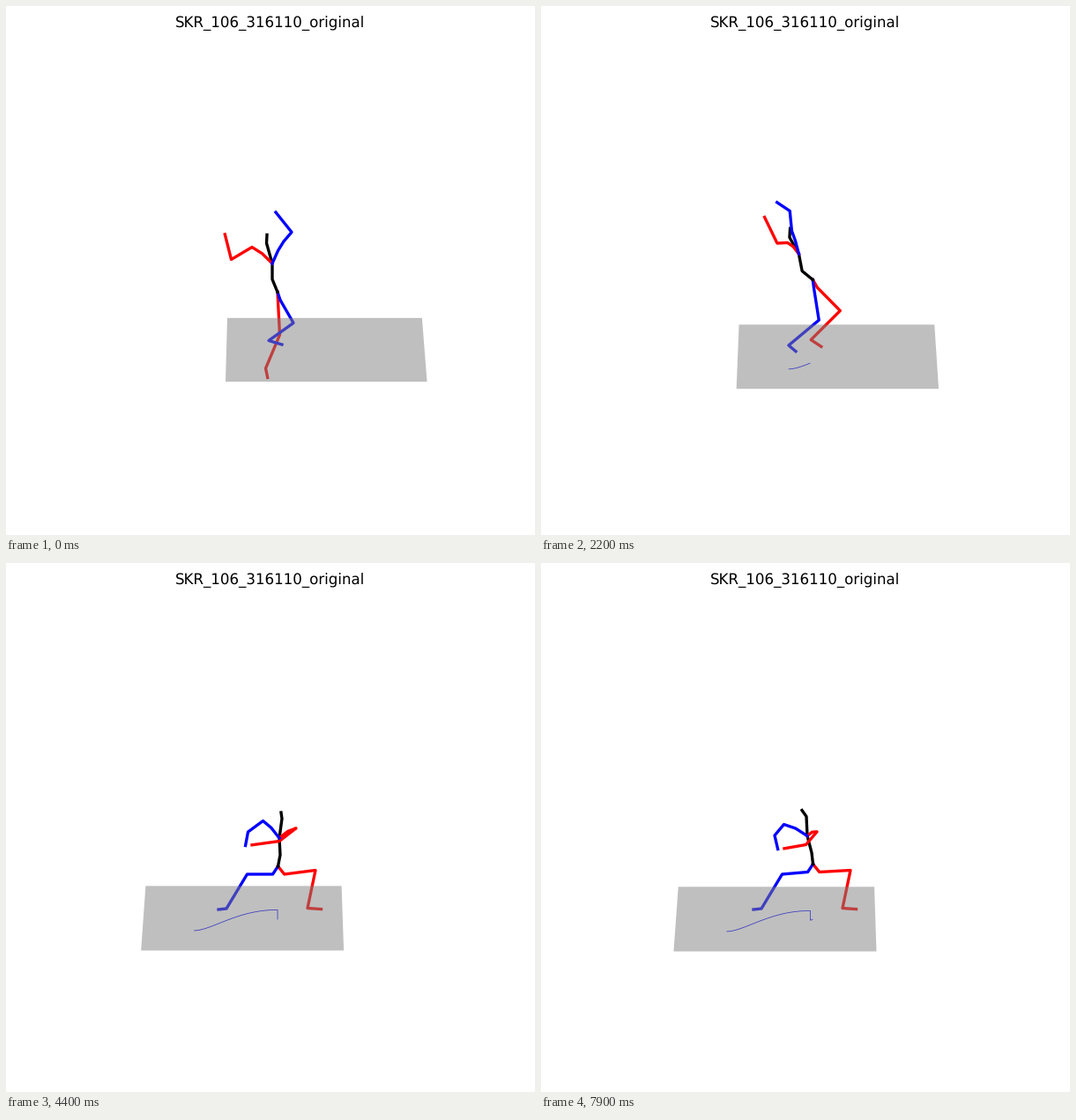
Recreate the animation shown at these times as a matplotlib script. Size 600 by 600 pixels, loop 8 s.

```python
import numpy as np
import matplotlib.pyplot as plt
from matplotlib.animation import FuncAnimation
from matplotlib.patches import Polygon

SIZE, DPI, FRAMES, STEP = 600, 100, 80, 100
LANDING, SETTLED = 36, 41
CENTER_X, FLOOR_Y, TRAIL_Y = 308, 390, 404

# Rows of a pose: 0-4 spine from root to head, 5-7 right arm, 8-10 left arm,
# 11-13 right leg, 14-16 left leg.
UPPER, SPINE, ARMS = slice(0, 11), slice(0, 5), slice(5, 11)


def pose(spine, right_arm, left_arm, right_leg, left_leg):
    return np.array(spine + right_arm + left_arm + right_leg + left_leg, float)


def tilt(points, pivot, degrees):
    a = np.radians(degrees)
    turn = np.array([[np.cos(a), np.sin(a)], [-np.sin(a), np.cos(a)]])
    return pivot + (points - points[0]) @ turn.T


wind_up = pose(
    [(308, 324.5), (302, 310), (302, 292), (295.5, 269), (296, 259.5)],
    [(279, 273.5), (255.5, 287.5), (248.3, 259)],
    [(315, 267), (324, 256.5), (306, 234)],
    [(310.5, 373), (294.5, 411), (296.7, 421.5)],
    [(326, 359.5), (298, 379.5), (313, 384)])

lean_back = np.vstack([
    tilt(wind_up[UPPER], (308.5, 317), 11),
    [(311, 368.5), (286, 404.5), (291.7, 414)],
    [(319, 355.5), (290, 380.5), (302.5, 386.5)]])

kick = pose(
    [(308, 315.5), (297.5, 307), (296, 286.5), (289.5, 269), (293, 259)],
    [(298, 275), (297.5, 265), (288.7, 237)],
    [(281, 261), (279, 236), (277.5, 233.3)],
    [(359, 333.5), (326, 367), (342, 372.5)],
    [(304.3, 359.5), (269.5, 391.5), (271.8, 397.5)])

lunge = pose(
    [(308, 355), (314.5, 343), (322, 323.5), (330, 303), (339, 296)],
    [(343, 315), (363, 318.3), (381.4, 307)],
    [(327, 296.5), (354, 295), (382.5, 294.5)],
    [(351.5, 354.5), (342, 399), (358, 400.4)],
    [(268, 369), (248, 405.5), (239, 406)])

rest = pose(
    [(308.5, 344), (311, 331), (310, 312), (313, 290), (312, 283)],
    [(329, 300.8), (310, 315.5), (279, 319.8)],
    [(291.5, 292.5), (274.5, 305), (271.6, 320.5)],
    [(351, 348.5), (342, 391.5), (357.5, 392.6)],
    [(273.5, 353), (250, 392), (241, 393)])

KEY_TIMES = np.array([0, 15, 28, LANDING])
KEYS = np.stack([wind_up, lean_back, kick, lunge])
SLOPES = np.gradient(KEYS, KEY_TIMES, axis=0)


def ease(n, start, end):
    u = np.clip((n - start) / (end - start), 0, 1)
    return u * u * (3 - 2 * u)


def settle(n):
    """Fast start, soft stop just after the landing."""
    return 1 - (1 - np.clip((n - LANDING) / (SETTLED - LANDING), 0, 1)) ** 2


def swing_up(n):
    """Cubic path through the key poses up to the landing."""
    i = min(np.searchsorted(KEY_TIMES, n, side="right") - 1, len(KEYS) - 2)
    h = KEY_TIMES[i + 1] - KEY_TIMES[i]
    u = (n - KEY_TIMES[i]) / h
    return ((1 + 2 * u) * (1 - u) ** 2 * KEYS[i] + u * u * (3 - 2 * u) * KEYS[i + 1]
            + h * u * (1 - u) ** 2 * SLOPES[i] - h * u * u * (1 - u) * SLOPES[i + 1])


def body(n):
    if n <= LANDING:
        return swing_up(n)
    p = lunge + (rest - lunge) * settle(n)
    back, forth = ease(n, 44, 64), ease(n, 64, 79)
    along_spine = np.linspace(0, 1, 5)[:, None]
    p[SPINE] += along_spine * [5 * forth - 21 * back, 0] - [0, 2.5 * back]
    p[ARMS] += [-16 * back, 4 * back]
    along_arm = np.tile(np.linspace(0, 1, 3), 2)
    p[ARMS, 0] += 13 * forth * along_arm
    return p


def limbs(p):
    """Joint chains with hips and collars filled in."""
    root, chest = p[0], p[2]

    def leg(i):
        hip = root + [0.17 * (p[i, 0] - root[0]), 9]
        return np.vstack([root, hip, p[i:i + 3]])

    def arm(i):
        collar = (chest + p[i]) / 2 - [0, 2]
        return np.vstack([chest, collar, p[i:i + 3]])

    return [leg(11), leg(14), p[SPINE], arm(5), arm(8)]


def floor_shift(n):
    run = np.clip(n / LANDING, 0, 1)
    drift = ease(n, 44, 54) + ease(n, 72, 79)
    dx = -93.3 * run ** 2.55 - 1.3 * drift
    dy = 23.5 * ease(n, 0, LANDING) ** 2.7 - 10.6 * settle(n) + ease(n, 72, 79)
    return dx, dy


def scale(y):
    return 1 + 0.00047 * (y - FLOOR_Y)


def floor_corners(dx, dy):
    mid = FLOOR_Y + dy
    half = 36.15 * scale(mid) ** 2
    return [(CENTER_X + (x + dx) * scale(y), y)
            for x, y in [(-58, mid - half), (166.7, mid - half),
                         (166.7, mid + half), (-58, mid + half)]]


fig = plt.figure(figsize=(SIZE / DPI, SIZE / DPI), dpi=DPI, facecolor="white")
plt.rcParams["text.hinting"] = "none"
fig.suptitle("SKR_106_316110_original", x=0.4993, y=0.9813,
             fontsize=12, fontfamily="DejaVu Sans")
ax = fig.add_axes([0, 0, 1, 1])
ax.set(xlim=(0, SIZE), ylim=(SIZE, 0))
ax.axis("off")

trail, = ax.plot([], [], color="blue", lw=0.6, zorder=2)
lines = [ax.plot([], [], color=color, lw=2.4, zorder=3)[0]
         for color in ("red", "blue", "black", "red", "blue")]
ground = ax.add_patch(Polygon(floor_corners(0, 0), facecolor=(0.5, 0.5, 0.5, 0.5),
                              edgecolor="none", zorder=4))


def draw(n):
    dx, dy = floor_shift(n)
    ground.set_xy(floor_corners(dx, dy))
    past_x, past_y = floor_shift(np.arange(n))
    y = TRAIL_Y + dy - past_y
    trail.set_data(CENTER_X + (dx - past_x) * scale(y), y)
    for line, joints in zip(lines, limbs(body(n))):
        line.set_data(*joints.T)
    return [ground, trail, *lines]


anim = FuncAnimation(fig, draw, frames=FRAMES, interval=STEP,
                     repeat=True, repeat_delay=0, blit=False)
plt.show()
```
